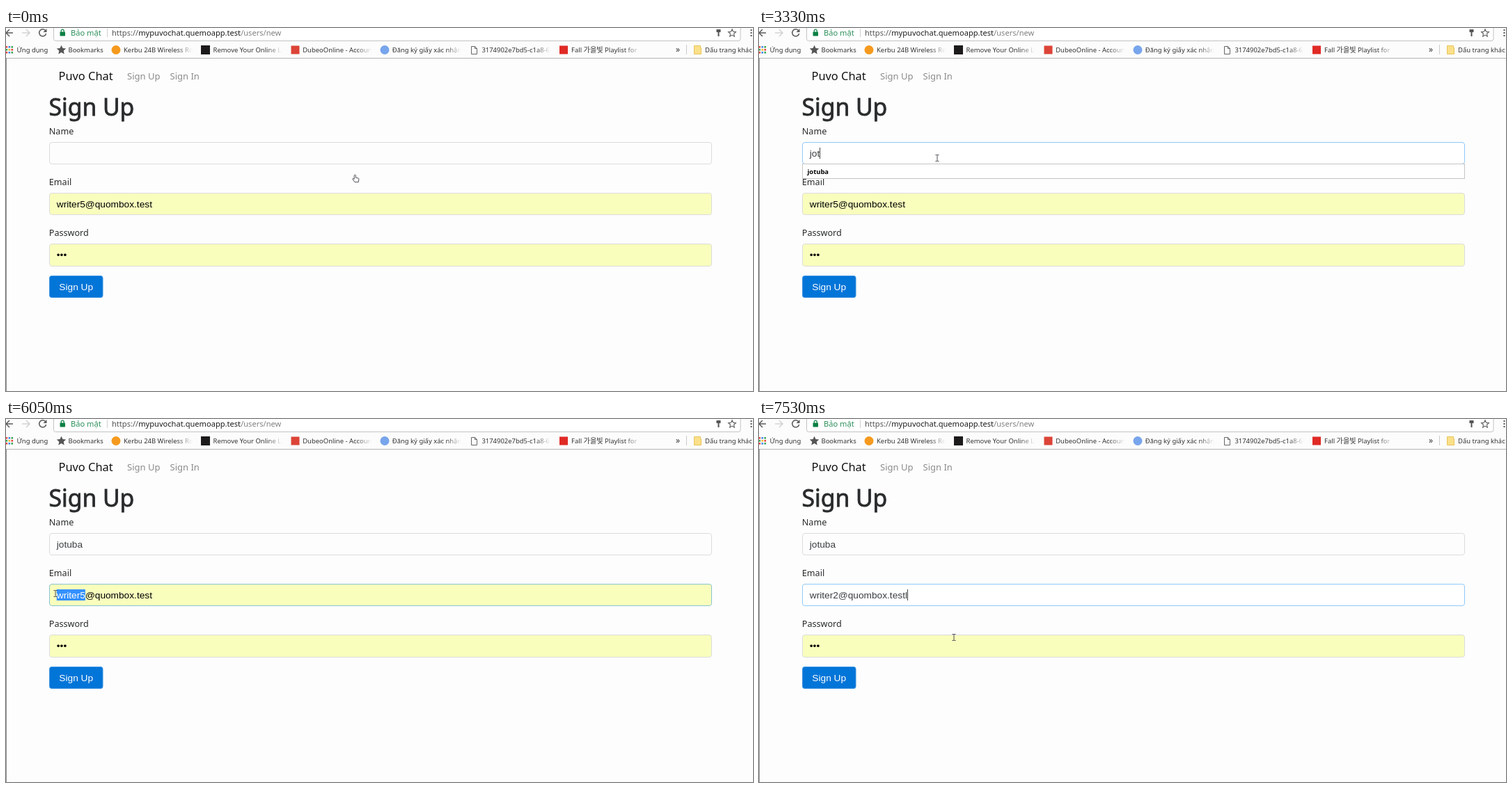
These frames come from a looping animation (1073x522 px, 8000 ms). An HTML page:

```html
<!DOCTYPE html>
<html lang="en">
<head>
<meta charset="utf-8">
<title>Sign Up</title>
<style>
  html, body { margin: 0; width: 100%; height: 100%; overflow: hidden; background: #fdfdfd; }
  svg { display: block; width: 100%; height: 100%; }
  text { font-family: "Noto Sans", "Noto Sans CJK KR", sans-serif; fill: #292b2c; white-space: pre; }
  .mark text { font-size: 9.45px; fill: #333; }
  .mark text.cut { fill: url(#fade); }
  .url { font-size: 11.1px; }
  .title { font-size: 33.7px; stroke: #292b2c; stroke-width: .8; }
  .brand { font-size: 16.4px; fill: #111; }
  .label { font-size: 12.6px; }
  .link { font-size: 13px; fill: #8b8b8b; }
  .value, .button { font: 13.7px "Liberation Sans", Arial, sans-serif; fill: #3a3e40; }
  .button { fill: #fff; }
  .submit { fill: #0275d8; stroke: #3b94e3; }
  .field { fill: #fdfdfd; stroke: #dcdcdc; }
  .field.focus { fill: #fff; stroke: #8fc9fa; }
  .field.auto { fill: #f9febd; }
  .field.auto.focus { stroke: #86c4d2; }
  .auto + .pick + .value { fill: #000; }
  .value .on { fill: #fff; }
  .pick { fill: #3390ff; }
  .caret { fill: #444; }
  .menu { fill: #fff; stroke: #c6c6c6; }
  .row { fill: none; }
  .row.hover { fill: #c9c9c9; }
  .item { font-size: 9.4px; font-weight: 700; fill: #000; }
  .icon { fill: none; stroke: #5a5a5a; stroke-width: 1.5; }
  .pointer { fill: #fff; stroke: #3c3c46; stroke-width: .9; stroke-linejoin: round; }
</style>
</head>
<body>
<svg viewBox="0 0 1073 522">
  <defs>
    <linearGradient id="fade" gradientUnits="userSpaceOnUse" x1="0" y1="0" x2="99" y2="0">
      <stop offset=".78" stop-color="#333"/>
      <stop offset="1" stop-color="#333" stop-opacity="0"/>
    </linearGradient>
  </defs>

  <!-- browser bars -->
  <rect width="1073" height="43" fill="#fcfcfc"/>
  <path d="M68.5 -2V15.5a3 3 0 0 0 3 3H1052a3 3 0 0 0 3-3V-2" fill="#fff" stroke="#c2c2c2"/>
  <path d="M0 43.5H1073" stroke="#b4b4b4"/>
  <path d="M.5 43V522" stroke="#8f8f8f"/>
  <path class="icon" d="M10 7H0M5 2L0 7l5 5"/>
  <path class="icon" style="stroke:#d2d2d2" d="M23 7h11M29 2l5 5-5 5"/>
  <path class="icon" d="M56.5 3.5A5 5 0 1 0 57.6 8"/>
  <path d="M58.5 1v5h-5z" fill="#5a5a5a"/>
  <rect x="77.5" y="5.5" width="7.5" height="6" rx=".8" fill="#0b8043"/>
  <path d="M79.2 6V4.2a2 2 0 0 1 4 0V6" fill="none" stroke="#0b8043" stroke-width="1.2"/>
  <text class="url" x="93" y="11" style="fill:#2b8f59">Bảo mật</text>
  <path d="M145.5 1V13" stroke="#cfcfcf"/>
  <text class="url" x="152" y="11" style="fill:#555">https://<tspan fill="#1d1d1d">mypuvochat.quemoapp.test</tspan><tspan fill="#808080">/users/new</tspan></text>
  <path d="M1020.5 2h6v4h-2v6h-2V6h-2z" fill="#555"/>
  <path class="icon" style="stroke-width:1.1" d="M1043 1.8l1.6 3.5 3.8.4-2.9 2.6.8 3.8-3.3-2-3.3 2 .8-3.8-2.9-2.6 3.8-.4z"/>
  <path d="M1069.5 2h2v2h-2zM1069.5 6h2v2h-2zM1069.5 10h2v2h-2z" fill="#555"/>

  <g class="mark" id="marks">
    <text x="15.5" y="34.7">Ứng dụng</text>
    <path d="M79.5 24.8l2 4.3 4.7.5-3.5 3.2 1 4.7-4.2-2.4-4.2 2.4 1-4.7-3.5-3.2 4.7-.5z" fill="#555"/>
    <text x="89.5" y="34.7">Bookmarks</text>
    <circle cx="158" cy="31.5" r="6.5" fill="#f59a1e"/>
    <rect x="280" y="25" width="13" height="13" fill="#1c1a1a"/>
    <rect x="409.5" y="25.5" width="12" height="12" fill="#dc4437"/>
    <circle cx="544" cy="31.5" r="6.5" fill="#78a5ec"/>
    <path d="M668.5 26.5h5l3 3v8h-8zM673.5 26.5v3h3" fill="#fff" stroke="#666"/>
    <rect x="795" y="25.5" width="12" height="12" fill="#e02a25"/>
    <text x="962" y="34.5" style="font-size:12px">»</text>
    <path d="M977.5 24V38" stroke="#ccc"/>
    <path d="M988.5 25.5h9v3h1v9h-10z" fill="#fbe08a" stroke="#e8c55c"/>
    <text x="1004" y="34.7">Dấu trang khác</text>
  </g>

  <!-- page -->
  <text class="brand" x="75.5" y="74.8">Puvo Chat</text>
  <text class="link" x="174" y="73.8">Sign Up</text>
  <text class="link" x="235.5" y="73.8">Sign In</text>
  <text class="title" x="61.5" y="125.8">Sign Up</text>
  <text class="label" x="61.8" y="152.7">Name</text>
  <text class="label" x="61.8" y="225.7">Email</text>
  <text class="label" x="61.8" y="298.7">Password</text>
  <g id="fields"></g>
  <rect class="submit" x="62.5" y="356.5" width="76.5" height="31" rx="3"/>
  <text class="button" x="100.7" y="377" text-anchor="middle">Sign Up</text>
  <g id="menus"></g>
  <g class="pointer">
    <path id="hand" d="M-1.8 -3.7a1.1 1.1 0 0 1 2.2 0V-.8l3.6 .8q1 .3 .9 1.4l-.7 4.2h-5.2l-3-4.1q-.2-1.3 1-1.1l1.2 .9z"/>
    <path id="arrow" d="M0 0V9l2.1-1.9 1.4 3.2 1.5-.7-1.4-3.1h2.8z"/>
    <path id="beam" fill="none" d="M-2.5 -4.5h2l.5 .5 .5-.5h2M0 -4V4M-2.5 4.5h2l.5-.5 .5 .5h2"/>
  </g>
</svg>
<script>
const LOOP = 8000;
const $ = id => document.getElementById(id);
const mail = n => `writer${n}@quombox.test`;
const USER = 'jotuba';

const titles = [
  'Kerbu 24B Wireless Ro',
  'Remove Your Online Lis',
  'DubeoOnline - Account',
  'Đăng ký giấy xác nhận',
  '3174902e7bd5-c1a8-6b',
  'Fall <tspan font-size="10.2">가을빛</tspan> Playlist for'
];
const dots = ['#e8453c', '#f9bb2d', '#3aa757', '#4688f1'];
let marks = titles.map((s, i) =>
  `<g transform="translate(${169 + 128.6 * i} 34.7)"><text class="cut">${s}</text></g>`).join('');
for (let i = 0; i < 9; i++) {
  const col = i % 3, row = Math.floor(i / 3);
  marks += `<rect x="${col * 4 - .5}" y="${26 + row * 4}" width="2.6" height="2.6" fill="${dots[(col * 3 + row * 2) % 4]}"/>`;
}
$('marks').insertAdjacentHTML('beforeend', marks);

const fields = { name: [164, 31], email: [237, 31], pass: [310, 32] };
$('fields').innerHTML = Object.entries(fields).map(([id, [y, height]]) => `
  <g id="${id}">
    <rect class="field" x="62.5" y="${y + .5}" width="951" height="${height}" rx="3.5"/>
    <rect class="pick" y="${y + 8}" width="0" height="16"/>
    <text class="value" x="72.8" y="${y + 21}"></text>
    <rect class="caret" y="${y + 8}" width="1" height="16"/>
  </g>`).join('');

function menu(id, y, height, items) {
  const rows = items.map((s, i) => `
    <rect class="row" x="63" y="${y + 1 + 20.5 * i}" width="949.5" height="20.5"/>
    <text class="item" x="69.5" y="${y + 14.5 + 20.5 * i}">${s}</text>`).join('');
  return `<g id="${id}"><rect class="menu" x="62.5" y="${y + .5}" width="951" height="${height}"/>${rows}</g>`;
}
$('menus').innerHTML = menu('nameMenu', 195, 21, [USER]) +
  menu('emailMenu', 268, 104, [5, 1, 2, 3, 4].map(mail));

// Each step overrides part of the state and holds until the next one.
const typed = n => ({ name: USER.slice(0, n), caret: true, open: 'nameMenu' });
const at = (cursor, x, y) => ({ cursor, x, y });
const steps = [
  [0, { ...at('hand', 502, 216), focus: '', name: '', email: mail(5), nameAuto: false,
        emailAuto: true, caret: false, from: 7, open: '', hover: -1 }],
  [280, at('arrow', 466, 209)],
  [410, at('arrow', 384, 203)],
  [540, at('beam', 309, 193)],
  [660, at('beam', 272, 191)],
  [790, at('beam', 260, 190.5)],
  [940, at('beam', 256, 187)],
  [1080, { focus: 'name', caret: true }],
  [1600, { caret: false }],
  [2130, { caret: true }],
  [2660, { caret: false }],
  [2940, typed(1)],
  [3070, typed(2)],
  [3330, typed(3)],
  [3860, { caret: false }],
  [3990, typed(4)],
  [4130, typed(5)],
  [4250, typed(6)],
  [4830, { caret: false }],
  [4980, { ...at('arrow', 206, 213), hover: 0, nameAuto: true }],
  [5120, { ...at('beam', 152, 242), hover: -1, nameAuto: false }],
  [5250, at('beam', 126, 248)],
  [5390, { ...at('beam', 117, 251), focus: 'email', open: '', caret: true }],
  [5520, { ...at('beam', 109, 251), from: 6, caret: false }],
  [5640, { ...at('beam', 104, 251), from: 5 }],
  [5770, at('beam', 100, 251)],
  [5920, { ...at('beam', 84, 251), from: 1 }],
  [6050, { ...at('beam', 71, 251), from: 0 }],
  [6310, { ...at('arrow', 196, 283), from: 7, open: 'emailMenu', hover: 0, caret: true }],
  [6430, { ...at('arrow', 282, 316), email: mail(2), hover: 2 }],
  [6970, { caret: false }],
  [7530, { ...at('beam', 280, 314), email: mail(2) + 'l', emailAuto: false, open: '', hover: -1, caret: true }]
];

const show = (el, on) => el.style.display = on ? '' : 'none';

function drawField(id, value, auto, s) {
  const [box, pick, text, caret] = $(id).children;
  const focus = s.focus === id;
  box.setAttribute('class', 'field' + (focus ? ' focus' : '') + (auto ? ' auto' : ''));
  const from = id === 'email' ? s.from : 7;
  text.innerHTML = from < 7
    ? `${value.slice(0, from)}<tspan class="on">${value.slice(from, 7)}</tspan>${value.slice(7)}`
    : value;
  show(pick, from < 7);
  if (from < 7) {
    const left = text.getStartPositionOfChar(from).x;
    pick.setAttribute('x', left);
    pick.setAttribute('width', text.getStartPositionOfChar(7).x - left);
  }
  show(caret, focus && s.caret);
  if (!focus || !s.caret) return;
  const clicked = id === 'email' && !s.open && auto;
  const width = !value ? 0 : clicked ? text.getSubStringLength(0, 7) : text.getComputedTextLength();
  caret.setAttribute('x', Math.round(72.8 + width));
}

function draw(s) {
  drawField('name', s.name, s.nameAuto, s);
  drawField('email', s.email, s.emailAuto, s);
  drawField('pass', '•••', true, s);
  for (const id of ['nameMenu', 'emailMenu']) {
    show($(id), s.open === id);
    $(id).querySelectorAll('.row').forEach((row, i) => row.classList.toggle('hover', i === s.hover));
  }
  for (const id of ['hand', 'arrow', 'beam']) show($(id), s.cursor === id);
  $(s.cursor).setAttribute('transform', `translate(${s.x} ${s.y})`);
}

let last = -1;
function tick() {
  const t = performance.now() % LOOP;
  const count = steps.filter(([start]) => start <= t).length;
  if (count !== last) {
    last = count;
    draw(Object.assign({}, ...steps.slice(0, count).map(step => step[1])));
  }
  requestAnimationFrame(tick);
}
tick();
</script>
</body>
</html>
```
